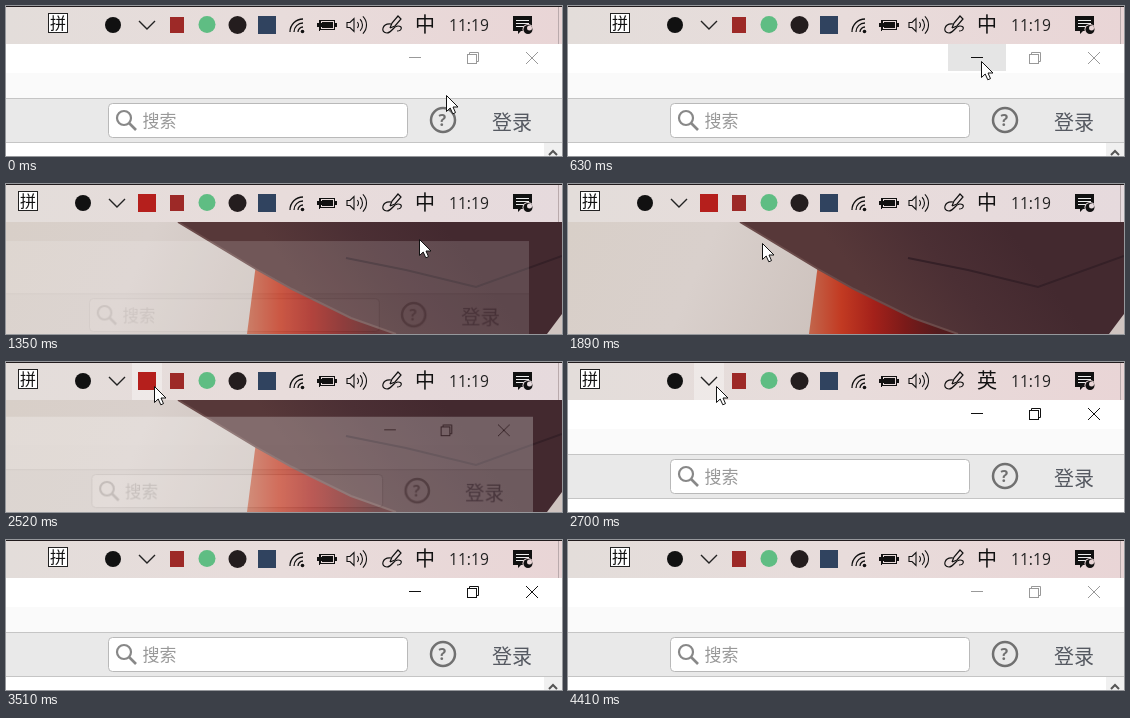
Animation, 556 px wide and 150 px high, one loop 4.5 s. Source, as an HTML page with a canvas:

```html
<!DOCTYPE html>
<html lang="zh">
<head>
<meta charset="utf-8">
<title>Taskbar</title>
<style>
html, body { margin: 0; width: 100%; height: 100%; overflow: hidden; background: #fff; }
canvas { display: block; width: 556px; height: 150px; }
</style>
</head>
<body>
<canvas id="stage" width="556" height="150"></canvas>
<script>
const W = 556, H = 150, LOOP = 4500, STEP = 90, BAR = 38;
const CJK = '"Noto Sans CJK SC", "Noto Sans CJK", sans-serif';
const INK = '#111';
const screen = document.getElementById('stage').getContext('2d');
const layer = document.createElement('canvas');
layer.width = W;
layer.height = H;
const win = layer.getContext('2d');

// Places where the pointer rests or turns.
const stops = [
  { t: 0, x: 440, y: 89 },
  { t: 360, x: 413, y: 55 },
  { t: 1620, x: 413, y: 55 },
  { t: 1890, x: 194, y: 59 },
  { t: 2250, x: 148, y: 24 },
  { t: 2970, x: 148, y: 24 },
  { t: 3510, x: 345, y: 155 }
];

const within = (t, a, b) => t >= a && t < b;
const mix = (a, b, p) => a + (b - a) * p;
function ease(t, a, b) {
  const u = Math.min(1, Math.max(0, (t - a) / (b - a)));
  return u * u * (3 - 2 * u);
}
function pointerAt(t) {
  const i = stops.findIndex(s => s.t > t);
  if (i < 0) return stops[stops.length - 1];
  const a = stops[i - 1], b = stops[i], p = ease(t, a.t, b.t);
  return { x: mix(a.x, b.x, p), y: mix(a.y, b.y, p) };
}
// 1 while the window is open, 0 while it is minimised.
const presence = t => 1 - ease(t, 1080, 1440) + ease(t, 2430, 2700);

function box(c, x, y, w, h, color) {
  c.fillStyle = color;
  c.fillRect(x, y, w, h);
}
function disc(c, x, y, r, color) {
  c.fillStyle = color;
  c.beginPath();
  c.arc(x, y, r, 0, Math.PI * 2);
  c.fill();
}
function trace(c, points) {
  c.beginPath();
  points.forEach(([x, y]) => c.lineTo(x, y));
}
function poly(c, points, fill) {
  trace(c, points);
  c.closePath();
  c.fillStyle = fill;
  c.fill();
}
function line(c, points, color, width = 1) {
  trace(c, points);
  c.strokeStyle = color;
  c.lineWidth = width;
  c.stroke();
}
function arc(c, x, y, r, a, b, color, width) {
  c.beginPath();
  c.arc(x, y, r, a, b);
  c.strokeStyle = color;
  c.lineWidth = width;
  c.stroke();
}
function text(c, s, x, y, font, color) {
  c.font = font;
  c.fillStyle = color;
  c.fillText(s, x, y);
}
function ramp(c, x0, y0, x1, y1, ...colors) {
  const g = c.createLinearGradient(x0, y0, x1, y1);
  colors.forEach((color, i) => g.addColorStop(i / (colors.length - 1), color));
  return g;
}

function drawDesktop(c) {
  box(c, 0, 0, W, H, ramp(c, 0, 40, 250, 150, '#d8cfc8', '#d9d0cc', '#cdc2bd'));
  poly(c, [[250, 80], [241, H], [392, H]],
    ramp(c, 241, 0, 370, 0, '#c2664c', '#c23a22', '#a4211a', '#7a1a19', '#521c1e'));
  const edge = [[172, BAR], [250, 85], [286, 105], [345, 134], [390, H]];
  poly(c, [...edge, [W, H], [W, BAR]],
    ramp(c, 310, 120, 430, 30, '#573839', '#4b2f34', '#43292f'));
  line(c, edge, '#6b4b4a', 2);
  line(c, [[340, 74], [400, 86], [470, 103], [W, 72]], '#352027', 2);
  poly(c, [[W, 130], [541, H], [W, H]], '#cfc4c0');
}

function drawButtons(c, focused, hover) {
  const color = focused ? INK : '#999';
  if (hover) box(c, 380, BAR, 58, 27, '#e5e5e5');
  line(c, [[403, 51.5], [415, 51.5]], hover ? INK : color);
  c.strokeStyle = color;
  c.strokeRect(461.5, 48.5, 9, 9);
  line(c, [[463.5, 48], [463.5, 46.5], [472.5, 46.5], [472.5, 55.5], [471, 55.5]], color);
  line(c, [[520, 46], [532, 58]], color);
  line(c, [[532, 46], [520, 58]], color);
}

function drawWindow(c, t) {
  c.clearRect(0, 0, W, H);
  box(c, 0, BAR, W, H - BAR, '#fff');
  box(c, 0, 67, W, 25, '#fafafa');
  box(c, 0, 92, W, 45, '#c5c5c5');
  box(c, 0, 93, W, 43, '#e9e9e9');
  const closing = within(t, 1260, 2430);
  if (!closing) drawButtons(c, within(t, 2430, 3780), within(t, 180, 1260));

  c.beginPath();
  c.roundRect(102.5, 97.5, 299, 34, 4);
  c.fillStyle = '#fff';
  c.fill();
  c.strokeStyle = '#b9b9b9';
  c.lineWidth = 1;
  c.stroke();
  arc(c, 118, 112, 7, 0, Math.PI * 2, '#888', 2.2);
  line(c, [[123, 117], [130, 124]], '#888', 2.6);
  text(c, '搜索', 136.5, 121, '17px ' + CJK, '#999');

  arc(c, 437, 114, 12, 0, Math.PI * 2, '#707070', 2.5);
  text(c, '?', 432.6, 120, 'bold 16px "Open Sans", sans-serif', '#707070');
  text(c, '登录', 486, 124, '20px ' + CJK, '#555961');

  if (!within(t, 1260, 2970)) {
    box(c, 538, 137, 18, 13, '#f0f0f0');
    line(c, [[543, 149], [547, 145], [551, 149]], '#555', 2);
  }
}

function drawWifi(c) {
  for (let r = 5; r < 14; r += 4) arc(c, 297, 26, r, Math.PI, Math.PI * 1.5, INK, 1.3);
  disc(c, 296.5, 25.5, 1.8, INK);
}
function drawBattery(c) {
  c.strokeStyle = INK;
  c.lineWidth = 1;
  c.strokeRect(314.5, 14.5, 14, 9);
  box(c, 316, 16, 11, 6, INK);
  box(c, 329, 17, 2, 4, INK);
  box(c, 311, 17, 6, 4, INK);
  line(c, [[313.5, 14], [313.5, 25]], INK);
}
function drawSpeaker(c) {
  trace(c, [[341, 16.5], [344, 16.5], [348, 12.5], [348, 25.5], [344, 21.5], [341, 21.5]]);
  c.closePath();
  c.strokeStyle = INK;
  c.lineWidth = 1.1;
  c.stroke();
  for (let r = 4; r < 13; r += 4) arc(c, 348.5, 19, r, -0.8, 0.8, INK, 1.1);
}
function drawPen(c) {
  line(c, [[384, 22], [386, 17], [392, 10], [395, 13], [389, 20], [384, 22]], INK, 1.2);
  c.beginPath();
  c.moveTo(385, 18);
  c.bezierCurveTo(376, 17, 374, 27, 381, 27);
  c.bezierCurveTo(386, 27, 387, 20, 392, 20);
  c.bezierCurveTo(397, 20, 396, 25, 391, 25);
  c.stroke();
}
function drawNotice(c, back) {
  poly(c, [[507, 10], [526, 10], [526, 25], [515, 25], [512, 28], [512, 25], [507, 25]], INK);
  for (let y = 14; y < 21; y += 3) box(c, 510, y, 13, 1, '#eee');
  disc(c, 522, 23.5, 5.5, back);
  disc(c, 522, 23.5, 4.5, INK);
  disc(c, 523.5, 22, 2.5, back);
}

function drawTaskbar(c, t) {
  const open = within(t, 1260, 2610);
  const shift = open ? -30 : 0;
  const pin = within(t, 1260, 2790) ? -30 : 0;
  const right = open ? '#e6dadd' : '#e9d5d6';
  box(c, 0, 0, W, BAR, ramp(c, 0, 0, W, 0, '#e3ddda', '#e8dcdb', right));
  box(c, 0, 0, W, 1, '#211b1d');
  if (within(t, 2070, 2970)) box(c, 126, 1, 30, 37, 'rgba(255, 255, 255, .35)');

  box(c, 42 + pin, 7, 20, 20, '#222');
  box(c, 43 + pin, 8, 18, 18, '#fff');
  text(c, '拼', 44 + pin, 22.5, '16px ' + CJK, INK);

  disc(c, 107 + shift, 19, 8, INK);
  line(c, [133, 141, 149].map((x, i) => [x + shift, i === 1 ? 23 : 15]), '#222', 1.4);
  if (open) box(c, 132, 10, 18, 18, '#b51f1c');
  box(c, 164, 11, 14, 16, '#9d2927');
  disc(c, 201, 18.5, 8.5, '#5fbd83');
  disc(c, 231.5, 19, 9, '#241d1e');
  box(c, 252, 10, 18, 18, '#30435f');

  drawWifi(c);
  drawBattery(c);
  drawSpeaker(c);
  drawPen(c);
  text(c, within(t, 2610, 2790) ? '英' : '中', 409, 26, '500 20px ' + CJK, INK);
  text(c, '11:19', 443, 25, '15.6px "Open Sans", sans-serif', '#222');
  drawNotice(c, right);
  box(c, 552, 1, 1, 37, '#b9aaac');
}

function drawPointer(c, { x, y }) {
  c.save();
  c.translate(Math.round(x) + 0.5, Math.round(y) + 0.5);
  const arrow = [[0, 0], [0, 16], [3.7, 12.5], [6.3, 18.3], [9, 17.1], [6.5, 11.5], [11.5, 11.5]];
  poly(c, arrow, '#fff');
  c.strokeStyle = INK;
  c.lineWidth = 1;
  c.stroke();
  c.restore();
}

function draw(time) {
  const t = Math.floor((time % LOOP) / STEP) * STEP;
  const shown = presence(t);
  drawDesktop(screen);
  if (shown > 0) {
    const away = (1 - shown) / 0.844;
    const scale = 1 - 0.031 * away;
    drawWindow(win, t);
    screen.save();
    screen.globalAlpha = shown;
    screen.translate(-15.8 * away, 20.2 * away);
    screen.scale(scale, scale);
    screen.drawImage(layer, 0, 0);
    screen.restore();
  }
  drawTaskbar(screen, t);
  drawPointer(screen, pointerAt(t));
}

const start = performance.now();
function tick() {
  draw(performance.now() - start);
  requestAnimationFrame(tick);
}
tick();
</script>
</body>
</html>
```
